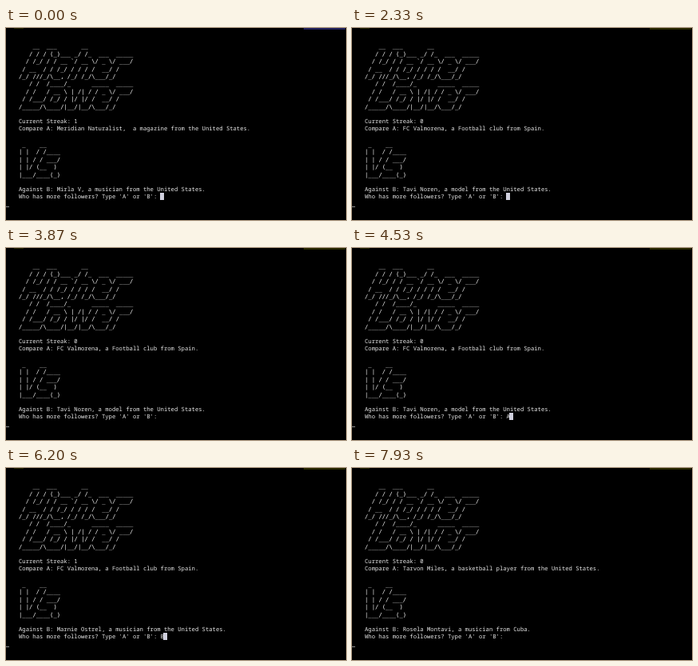
An HTML page that plays this animation: 426 px wide and 240 px high, repeating every 8 s.

```html
<!DOCTYPE html>
<html lang="en">
<head>
<meta charset="utf-8">
<title>Higher Lower</title>
<style>
  html, body { margin: 0; width: 100%; height: 100%; overflow: hidden; background: #000; }
  #stage { position: relative; width: 426px; height: 240px; overflow: hidden; background: #000; }
  #stage > * { position: absolute; }
  pre {
    left: 16px; top: 8.8px; margin: 0; color: #e8e8e8;
    font: 7.22px/9.43px "Noto Sans Mono", "DejaVu Sans Mono", monospace;
    text-rendering: geometricPrecision; font-variant-ligatures: none;
  }
  #art { font-family: "DejaVu Sans Mono", monospace; color: #fff; }
  #cursor { width: 4.4px; height: 9.4px; background: #d0d0de; }
  #tab { left: 10px; top: 0; width: 12px; height: 1px; background: #242400; }
  #bar { left: 373px; top: 0; width: 52px; height: 2px; }
  #prompt { left: 0; top: 223px; width: 4px; height: 1px; background: #8a8a8a; }
</style>
</head>
<body>
<div id="stage">
  <pre id="art"></pre>
  <pre id="text"></pre>
  <div id="cursor"></div>
  <div id="tab"></div>
  <div id="bar"></div>
  <div id="prompt"></div>
</div>
<script>
const LOOP = 8000, BLINK = 530;
const COL = 4.333, ROW = 9.43, LEFT = 15.5, TOP = 8;
const $ = id => document.getElementById(id);

// Starts with an empty row
const ART = String.raw`
    __  ___       __
   / / / (_)___ _/ /_  ___  _____
  / /_/ / / __ ${'`'}/ __ \/ _ \/ ___/
 / __  / / /_/ / / / /  __/ /
/_/ ///_/\__, /_/ /_/\___/_/
   / /  /____/_      _____  _____
  / /   / __ \ | /| / / _ \/ ___/
 / /___/ /_/ / |/ |/ /  __/ /
/_____/\____/|__/|__/\___/_/




 _    __
| |  / /____
| | / / ___/
| |/ (__  )
|___/____(_)`;

const round = (streak, a, b) => '\n'.repeat(11) +
  `Current Streak: ${streak}\nCompare A: ${a}.` + '\n'.repeat(8) +
  `Against B: ${b}.\nWho has more followers? Type 'A' or 'B': `;
const lost = "Wrong Answer. You lose with a streak of 1!\n" +
  "Would you like to play again? 'y' or 'n': ";

const club = 'FC Valmorena, a Football club from Spain';
const first = round(1, 'Meridian Naturalist,  a magazine from the United States',
  'Mirla V, a musician from the United States');
const second = round(0, club, 'Tavi Noren, a model from the United States');
const third = round(1, club, 'Marnie Ostrel, a musician from the United States');
const fourth = round(0, 'Tarvon Miles, a basketball player from the United States',
  'Rosela Montavi, a musician from Cuba');

// [start ms, screen, typed answer]
const steps = [
  [0, first, ''], [600, first, 'B'],
  [930, lost, ''], [1800, lost, 'y'],
  [2000, second, ''], [4270, second, 'A'],
  [4730, third, ''], [6070, third, 'B'],
  [6470, lost, ''], [7200, lost, 'y'],
  [7330, fourth, '']
];

let shown = null;

function show(step) {
  const [, screen, typed] = step;
  const lines = (screen + typed).split('\n');
  const last = lines.length - 1;
  $('text').textContent = screen + typed;
  $('art').textContent = screen === lost ? '' : ART;
  $('cursor').style.left = LEFT + lines[last].length * COL + 'px';
  $('cursor').style.top = TOP + last * ROW + 'px';
  shown = step;
}

function frame(now) {
  const t = now % LOOP;
  const step = steps.findLast(s => s[0] <= t);
  if (step !== shown) show(step);
  const on = Math.floor((t - step[0]) / BLINK) % 2 === 0;
  $('cursor').style.visibility = on ? 'visible' : 'hidden';
  $('bar').style.background = t < 70 ? '#20205a' : '#282800';
  requestAnimationFrame(frame);
}
frame(performance.now());
</script>
</body>
</html>
```
